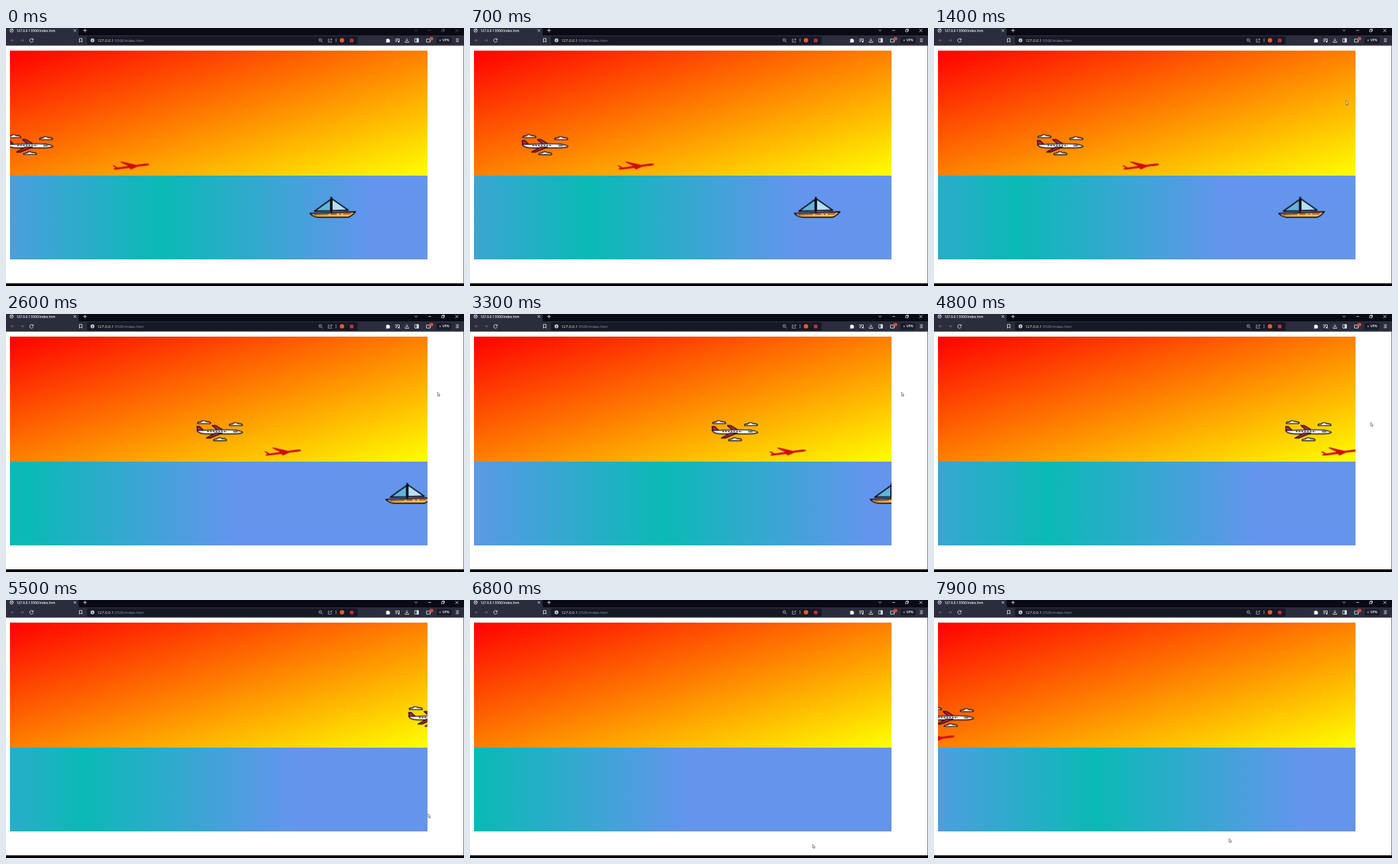
An HTML page for the animation above (8 s loop, 690x388 px).

```html
<!DOCTYPE html>
<html lang="en">
<head>
<meta charset="utf-8">
<title>Sunset flight</title>
<style>
  html, body { margin: 0; width: 100%; height: 100%; overflow: hidden; background: #fff; }
  svg { position: absolute; left: 0; top: 0; display: block; }
  text { font-family: "Open Sans", "Noto Sans", sans-serif; }

  #scene { position: absolute; left: 6px; top: 33.5px; width: 629px; height: 314.5px; overflow: hidden; }
  #sky { height: 188.5px; background: linear-gradient(to bottom right, red, yellow); }
  #sea {
    width: 943.5px; height: 126px;
    background: linear-gradient(to right, #6495ed 0, #0abab5 314.5px, #6495ed 629px);
    animation: drift 4s -1.09s linear infinite;
  }

  .plane, .jet, .boat, .cursor, .controls { animation: 8s linear infinite; }
  .plane { animation-name: plane; }
  .jet { animation-name: jet; }
  .boat { animation-name: boat; }
  .cursor { animation-name: cursor; }
  .controls { animation-name: focus; animation-timing-function: step-end; }

  @keyframes drift { to { transform: translateX(-314.5px); } }
  @keyframes plane {
    0% { transform: translateX(0); }
    75% { transform: translateX(660px); }
    75.01% { transform: translateX(-220px); }
    100% { transform: translateX(0); }
  }
  @keyframes jet {
    0% { transform: translateX(0); }
    72% { transform: translateX(507px); }
    72.01% { transform: translateX(-373px); }
    100% { transform: translateX(-176px); }
  }
  @keyframes boat { to { transform: translateX(352px); } }
  @keyframes cursor {
    0%, 12% { transform: translate(700px, 30px); }
    17.5% { transform: translate(620.5px, 109.5px); }
    23.75% { transform: translate(632px, 85px); }
    28.75%, 57% { transform: translate(650px, 117.5px); }
    62.5% { transform: translate(664px, 200px); }
    68.75% { transform: translate(636px, 321.5px); }
    80% { transform: translate(588px, 376px); }
    90%, 100% { transform: translate(444.5px, 358.5px); }
  }
  @keyframes focus { 0% { opacity: .35; } 6.25% { opacity: 1; } }
</style>
</head>
<body>
<div id="scene">
  <div id="sky"></div>
  <div id="sea"></div>
  <svg width="629" height="314.5" viewBox="6 33.5 629 314.5">
    <defs>
      <path id="cloud" d="M1 4.4Q.6 2.9 3.5 2.6Q6 2.8 7.2 1.3Q11-.6 13.4 1.8Q19 1.6 20.5 3.6Q21 4.8 19 5H2Q1 5 1 4.4Z"
        fill="#fff" stroke="#111" stroke-width="1.4"/>
    </defs>

    <g class="jet" fill="#cf0d12">
      <path d="M160 206.5L163 206.3L168 209.3L184 207L171 200.8L175 200.6L196 205.3L211 203.2Q217 203.3 215.5 205.3Q213 206.8 198 208L189 212Q186.5 212.3 186 210L167 212.3Q161 212.8 162 211L165 209.8Z"/>
    </g>

    <g class="boat" stroke="#0b0b12" stroke-width="1.8" stroke-linejoin="round">
      <path d="M489 257.5L464.5 275L489 274.3Z" fill="#62b4dc"/>
      <path d="M491 256.5L515.5 273.5L491 274.2Z" fill="#b4e2f2"/>
      <path d="M457.8 278.3L526.5 275.8Q521 282.5 515 284.2H471Q462 283.6 457.8 278.3Z" fill="#ffc24f"/>
      <path d="M461 279.3L521 277.4" stroke="#d6443c" stroke-width="1.1"/>
      <path d="M464 280.5L519 279" stroke-width=".8" stroke-dasharray="22 3 9 4 3 3"/>
      <path d="M490 253.5V277" stroke-width="2.6"/>
    </g>

    <g class="plane" stroke="#141018" stroke-width="1.4" stroke-linejoin="round">
      <use href="#cloud" x="1.5" y="159.4"/>
      <use href="#cloud" x="49.5" y="162.4"/>
      <use href="#cloud" x="25.5" y="185"/>
      <path d="M24.5 167.2H29.5L42 174.5H33Z" fill="#d3213c"/>
      <path d="M1.5 168.7H5.5L11.5 174.6H2.5Z" fill="#d3213c"/>
      <path d="M1.5 174.2L11 174.6Q45 172.8 60 174.2Q70.5 176 70.5 177.5Q69 179.4 58 179.8H15Q3 179 1.5 174.2Z" fill="#fff"/>
      <path d="M17 176.3H47" stroke-width="1.5" stroke-dasharray="2.6 1.6" fill="none"/>
      <path d="M56 176.6H62.5" stroke-width="1.2"/>
      <path d="M15.5 186L29 178.6H39.5L21.5 186Z" fill="#d3213c"/>
    </g>
  </svg>
</div>

<svg width="690" height="388" viewBox="0 0 690 388">
  <path d="M0 0H690V12H0Z" fill="#090a14"/>
  <path d="M0 11H690V26.5H0Z" fill="#2b2d3d"/>
  <path d="M0 0H107Q109.500 0 109.500 2.500V11H0Z" fill="#2b2d3d"/>
  <rect x="122" y="12.500" width="408" height="12.500" rx="2" fill="#171925"/>
  <path d="M0 384H690V388H0Z" fill="#000"/>
  <path d="M689.500 26V384" stroke="#5a5a62" stroke-width=".8"/>

  <text x="15.800" y="5.500" font-size="4.850" font-weight="600" fill="#f2f2f5">127.0.0.1:5500/index.htm</text>
  <text x="137.500" y="20.700" font-size="5.900" fill="#9496a3"><tspan fill="#f0f0f4">127.0.0.1</tspan>:5500/index.htm</text>

  <g fill="none" stroke="#dcdde4" stroke-width=".9">
    <circle cx="8.500" cy="3.700" r="2.600"/>
    <path d="M6.500 2.500L9 3.500L7.500 5.500M9 1.500L10.500 3.800"/>
    <path d="M102 2L105.500 5.500M105.500 2L102 5.500"/>
    <path d="M119 1V6.500M116.200 3.700H121.800"/>

    <path d="M12.500 18.500H7.500M9.800 16.200L7.500 18.500L9.800 20.800M21.500 18.500H26.500M24.200 16.200L26.500 18.500L24.200 20.800" stroke="#626474"/>
    <path d="M40.500 17A2.700 2.700 0 1 0 41 19.200M41 15.500V17.700H38.800"/>
    <path d="M110.500 15.800H114.500V21.200L112.500 19.700L110.500 21.200Z"/>
    <circle cx="130.300" cy="18.500" r="2.900" fill="#c3c4cc" stroke="none"/>
    <path d="M130.300 16.800V17.500M130.300 18.200V20.300" stroke="#171925"/>

    <g stroke="#a9abb8" stroke-width=".8">
      <circle cx="473.500" cy="18" r="2.100"/>
      <path d="M475 19.600L477.200 21.600M472.400 18H474.600"/>
      <path d="M487 16.500H485.500V21.300H490.500V19.800M487 19.500Q487.300 17.200 491 17.200M489.600 15.800L491.200 17.200L489.600 18.600"/>
      <path d="M497.200 15.500V21.500"/>
    </g>

    <path d="M589.500 16.500H593M586.500 16.500H592M586.500 18.500H590.500M586.500 20.500H589M592.500 17V20.500"/>
    <circle cx="591.600" cy="20.500" r=".9" fill="#dcdde4"/>
    <path d="M604 15.500V19.600M602 17.800L604 19.800L606 17.800M601.200 19.800V21.500H606.800V19.800"/>
    <path d="M615.800 16H621.400V21.200H615.800Z"/>
    <path d="M619 16H621.400V21.200H619Z" fill="#dcdde4"/>
    <path d="M633.500 16.700H639.300V21.200H633.500ZM637.500 19H639.300"/>
    <path d="M677.800 16.300H682.200M677.800 18.400H682.200M677.800 20.500H682.200"/>
  </g>

  <path d="M572.500 16.800H574.200A1.100 1.100 0 0 1 576.400 16.800H578V18.300A1.100 1.100 0 0 1 578 20.400V21.700H572.500V20.200A1 1 0 0 0 572.500 18.400Z" fill="#f0f0f4"/>
  <circle cx="506.200" cy="18.500" r="3.300" fill="#fb542b"/>
  <circle cx="520.800" cy="18.700" r="2.900" fill="#c92a4b"/>
  <circle cx="641" cy="16" r="2.700" fill="#e2492f"/>

  <rect x="648.500" y="13.500" width="23" height="10" rx="2" fill="#1a1c29"/>
  <circle cx="654" cy="18.500" r="1" fill="#c5c6d0"/>
  <text x="657.300" y="20.400" font-size="5.200" font-weight="600" fill="#eceef2">VPN</text>

  <g class="controls" fill="none" stroke="#e4e5ea" stroke-width=".8">
    <path d="M615.500 2.500L617.700 4.700L619.900 2.500M636 3.700H640.500M656.200 2.700H659.400V5.700H656.200ZM657.400 2.500V1.500H660.500V4.600H659.500M677 1.500L681.500 6M681.500 1.500L677 6"/>
  </g>

  <path class="cursor" d="M0 0V5.700L1.300 4.600L2.200 6.600L3.100 6.200L2.300 4.200H4Z" fill="#fff" stroke="#3a3a40" stroke-width=".6"/>
</svg>
</body>
</html>
```
